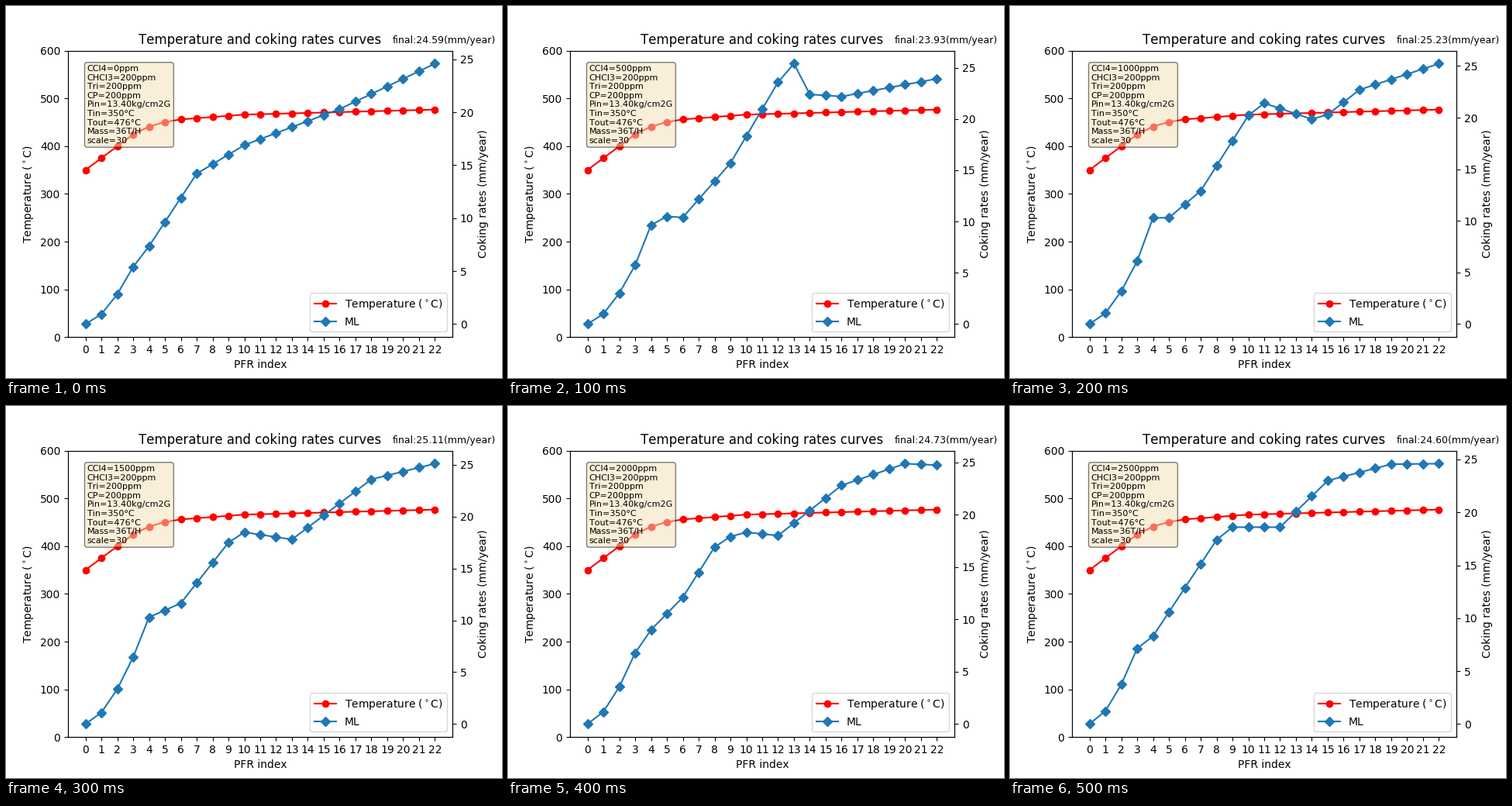
A matplotlib script for the animation above (0.6 s loop, 640 px wide and 480 px high).

```python
import matplotlib.pyplot as plt
import numpy as np
from matplotlib.animation import FuncAnimation

plt.rcParams["text.kerning_factor"] = 6

INDEX = np.arange(23)
RAMP_END = 4

# Points (PFR index, value) where a curve bends; it runs straight between them
TEMPERATURE_BENDS = [(0, 350), (3, 424.5), (4, 441), (5, 450.5), (6, 456),
                     (10, 466), (22, 476.5)]
# Coking rates after the opening ramp, by CCl4 dose in ppm
RATE_BENDS = {
    0: [(4, 7.35), (7, 14.2), (10, 16.9), (16, 20.3), (22, 24.59)],
    500: [(4, 9.65), (5, 10.5), (6, 10.4), (9, 15.7), (12, 23.6), (13, 25.4),
          (14, 22.4), (16, 22.2), (22, 23.93)],
    1000: [(4, 10.3), (5, 10.3), (7, 12.9), (10, 20.2), (11, 21.4), (14, 19.85),
           (15, 20.3), (17, 22.7), (22, 25.23)],
    1500: [(4, 10.3), (6, 11.65), (9, 17.5), (10, 18.5), (13, 17.8), (18, 23.6),
           (22, 25.11)],
    2000: [(4, 9), (6, 12.1), (8, 16.9), (9.5, 18.4), (12, 18), (16, 22.8),
           (20, 24.87), (22, 24.73)],
    2500: [(4, 8.3), (8, 17.4), (9, 18.6), (12, 18.6), (15, 23), (19, 24.55),
           (22, 24.6)],
}
DOSES = list(RATE_BENDS)

CONDITIONS = """CCl4={}ppm
CHCl3=200ppm
Tri=200ppm
CP=200ppm
Pin=13.40kg/cm2G
Tin=350°C
Tout=476°C
Mass=36T/H
scale=30"""


def through(bends):
    return np.interp(INDEX, *zip(*bends))


def coking_rates(dose):
    ramp = (0.93 + 0.00012 * dose) * INDEX ** 1.6
    return np.where(INDEX < RAMP_END, ramp, through(RATE_BENDS[dose]))


fig, ax = plt.subplots(figsize=(6.4, 4.8), dpi=100)
rate_ax = ax.twinx()

temp_line, = ax.plot(INDEX, through(TEMPERATURE_BENDS), "o-", color="red",
                     label=r"Temperature ($^\circ$C)")
rate_line, = rate_ax.plot(INDEX, coking_rates(0), "D-", color="C0", label="ML")

ax.set_title("Temperature and coking rates curves")
ax.set_xlabel("PFR index")
ax.set_ylabel(r"Temperature ($^\circ$C)")
rate_ax.set_ylabel("Coking rates (mm/year)")
ax.set_xticks(INDEX)
ax.set_ylim(0, 600)
rate_ax.legend(handles=[temp_line, rate_line], loc="lower right")

info = ax.text(0.05, 0.95, "", transform=ax.transAxes, fontsize=8, va="top",
               bbox=dict(boxstyle="round", facecolor="wheat", alpha=0.5))
final = fig.text(498.5 / 640, 1 - 48 / 480, "", fontsize=9)


def update(frame):
    dose = DOSES[frame]
    rates = coking_rates(dose)
    peak = rates.max()
    rate_line.set_ydata(rates)
    rate_ax.set_ylim(-0.05 * peak, 1.05 * peak)
    info.set_text(CONDITIONS.format(dose))
    final.set_text(f"final:{rates[-1]:.2f}(mm/year)")
    return rate_line, info, final


anim = FuncAnimation(fig, update, frames=len(DOSES), interval=100, repeat=True)
plt.show()
```
